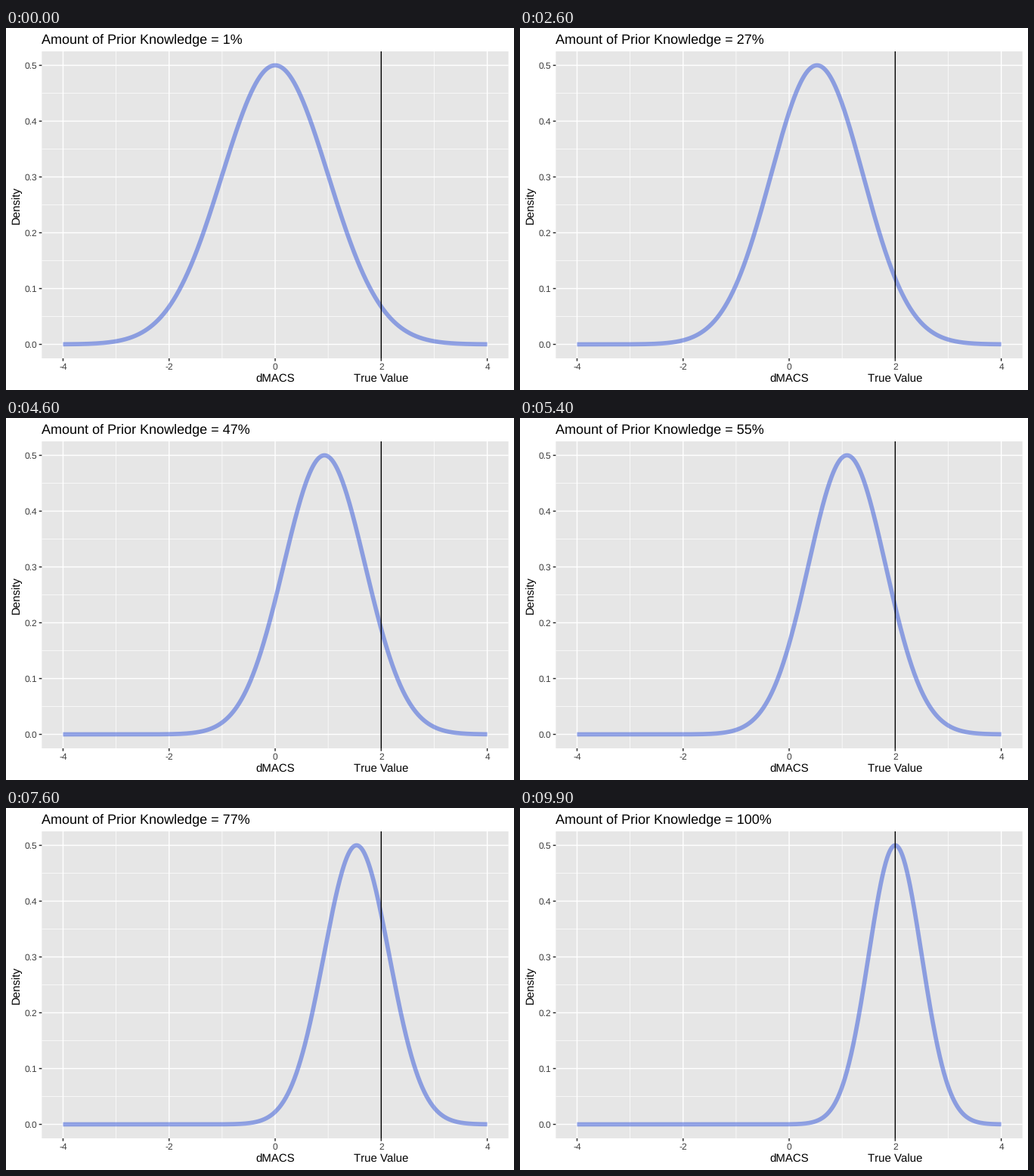
A matplotlib script that plays this animation: 672x480 px, repeating every 10 s.

```python
import matplotlib.pyplot as plt
import numpy as np
from matplotlib.animation import FuncAnimation
from matplotlib.patches import Rectangle

W, H, DPI = 672, 480, 96
FRAMES = 100
PT = 72 / DPI  # points per pixel
LEFT, RIGHT, TOP, BOTTOM = 47.4, 664.67, 31, 438
GRID, TICK = 1.42, 3.67

plt.rcParams.update({
    "font.family": "Liberation Sans",
    "text.hinting": "none",
    "text.hinting_factor": 1,
})

fig = plt.figure(figsize=(W / DPI, H / DPI), dpi=DPI, facecolor="white")
ax = fig.add_axes([0, 0, 1, 1])
ax.set(xlim=(0, W), ylim=(H, 0))
ax.axis("off")


def px(x):
    return LEFT + (x + 4.4) * (RIGHT - LEFT) / 8.8


def py(y):
    return BOTTOM - (y + 0.025) * (BOTTOM - TOP) / 0.55


def line(xs, ys, color, width, **kw):
    return ax.plot(xs, ys, color=color, lw=width * PT, snap=False,
                   solid_capstyle="butt", **kw)[0]


def label(x, y, text, size, color="black", ha="center", **kw):
    return ax.text(x, y, text, size=size, color=color, ha=ha,
                   va="baseline", **kw)


def vgrid(x, width):
    line([px(x)] * 2, [TOP, BOTTOM], "white", width)


def hgrid(y, width):
    line([LEFT, RIGHT], [py(y)] * 2, "white", width)


ax.add_patch(Rectangle((LEFT, TOP), RIGHT - LEFT, BOTTOM - TOP,
                       fc="#e6e6e6", lw=0, snap=False))

for x in (-3, -1, 1, 3):
    vgrid(x, GRID / 2)
for y in np.arange(0.05, 0.5, 0.1):
    hgrid(y, GRID / 2)

for x in range(-4, 5, 2):
    vgrid(x, GRID)
    line([px(x)] * 2, [BOTTOM, BOTTOM + TICK], "#262626", GRID)
    label(px(x), 453, str(x), 8.8, "#3d3d3d")
for y in np.arange(6) / 10:
    hgrid(y, GRID)
    line([LEFT - TICK, LEFT], [py(y)] * 2, "#262626", GRID)
    label(41, py(y) + 4.2, f"{y:.1f}", 8.8, "#3d3d3d", ha="right")

label(px(0), 470, "dMACS", 11)
label(px(2), 470, "True Value", 11)
label(18, (TOP + BOTTOM) / 2, "Density", 11, rotation=90,
      rotation_mode="anchor")
title = label(47, 20, "", 13.2, ha="left")

grid_x = np.linspace(-4, 4, 801)
curve = line(px(grid_x), py(0 * grid_x), "#3255da", 5.69, alpha=0.5)
line([px(2)] * 2, [TOP, BOTTOM], "black", GRID)


def update(i):
    t = i / (FRAMES - 1)
    mean, sd = 2 * t, 1 - t / 2
    density = 0.5 * np.exp(-0.5 * ((grid_x - mean) / sd) ** 2)
    curve.set_ydata(py(density))
    title.set_text(f"Amount of Prior Knowledge = {i + 1}%")
    return curve, title


anim = FuncAnimation(fig, update, frames=FRAMES, interval=100,
                     repeat=True, repeat_delay=0, blit=False)
plt.show()
```
